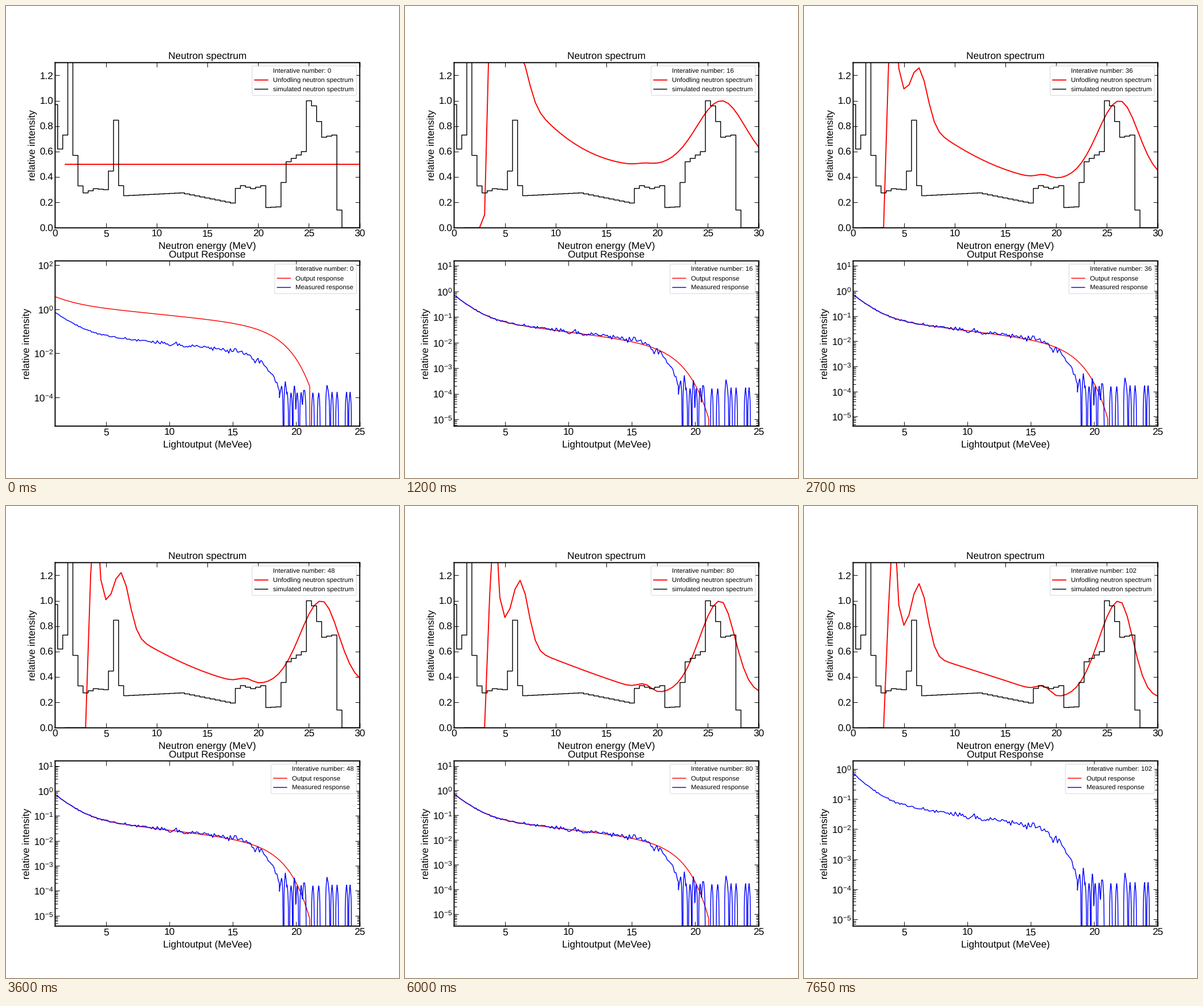
A matplotlib script that plays this animation: 683x820 px, repeating every 7.8 s.

```python
import numpy as np
import matplotlib.pyplot as plt
from matplotlib.animation import FuncAnimation
from matplotlib.ticker import LogLocator

FRAMES, STEP_MS = 52, 150
LAST = 2 * (FRAMES - 1)
DPI = 68.3
EDGE = 21.08       # highest light output of the folded response
ONE_COUNT = 1.7e-4
TINY = 1e-12

plt.rcParams.update({
    "font.family": "Liberation Sans", "font.size": 18, "text.hinting": "none",
    "mathtext.fontset": "custom", "mathtext.rm": "Liberation Sans",
    "mathtext.default": "regular", "path.snap": False,
    "axes.titlesize": 18, "axes.labelsize": 18, "axes.linewidth": 2,
    "legend.fontsize": 12,
    "xtick.direction": "in", "ytick.direction": "in",
    "xtick.top": True, "ytick.right": True,
    "xtick.major.size": 8, "ytick.major.size": 8, "ytick.minor.size": 5,
    "xtick.major.width": 1, "ytick.major.width": 1, "ytick.minor.width": 1,
})

bins = np.arange(0, 30.1, .5)
energy = bins[2:]
light = np.arange(1, 25, .02)

# Corners of the simulated spectrum: energy, intensity
CORNERS = [
    (0, .97), (.5, .62), (1, .73), (1.5, 1.6), (2, .57), (2.5, .33), (3, .275),
    (4, .308), (5, .3), (5.5, .447), (6, .847), (6.5, .332), (7, .253),
    (12.5, .275), (17.5, .195), (18, .31), (18.5, .332), (19.5, .308),
    (20.5, .332), (21, .16), (22, .165), (22.5, .357), (23, .52), (24.5, .6),
    (25, 1), (25.5, .96), (26.5, .713), (27.5, .73), (28, .14), (28.5, 0)]
simulated = np.interp(bins, *zip(*CORNERS))

# Isolated counts in the measured tail; a repeated place counts again
COUNTS = [18.73, 18.85, 18.85, 19.14, 19.14, 19.14, 19.28, 19.59, 19.855, 19.855,
          20.07, 20.385, 20.58, 20.67, 21.31, 21.77, 22.42, 22.42, 22.53,
          22.82, 23.22, 23.96, 24.24]


def gauss(x, center, width):
    return np.exp(-.5 * ((x - center) / width) ** 2)


def progress(n):
    """Logarithmic progress, zero at eight iterations."""
    return np.log(max(n, 1) / 8)


def spectrum(n):
    """Unfolded spectrum: base, tail to low energies and three peaks."""
    if n == 0:
        return np.full(energy.size, .5)
    t = progress(n)
    base = .585 - .137 * t
    tail = (.386 - .038 * t) * (np.clip(20 - energy, 0, None) / 11) ** (3 - .8 * t)
    center = 26.2 + .3 * np.exp(-1.2 * t)
    width = np.where(energy < center, 1.95 + np.exp(-1.1 * t), 2.85 * np.exp(-.3 * t))
    y = base + tail + (1 - base) * gauss(energy, center, width)
    y += (.2 + .135 * t) * gauss(energy, 6.5, .8)
    y += (.6 + .18 * t) * np.exp(-abs(energy - 4) / .4)
    y += .022 * max(t, 0) * gauss(energy, 18.75, .7)
    y *= np.exp(-1.4 * n * np.clip(3.35 - energy, 0, None) ** 2)
    if n == LAST:
        y[0] = np.nan
    return y


def falling(x, fast, slow, fast_len, slow_len, edge, steep):
    """log10 of two exponentials, cut off by an edge near 18 MeVee."""
    y = fast * np.exp(-(x - 1) / fast_len) + slow * np.exp(-(x - 1) / slow_len)
    return np.log10(y) - edge * np.exp(steep * (x - 18))


def response(n):
    t = progress(n)
    first = falling(light, 2, 1.75, 1.2, 7.6, .456, .57)
    fitted = falling(light, .63, .092, 1, 7 + .15 * t, .456, .57 + .018 * t)
    w = .1 ** (n / 2)
    return np.where(light <= EDGE, 10 ** (w * first + (1 - w) * fitted), TINY)


def measured():
    """Noisy falling curve that ends in isolated counts."""
    rng = np.random.default_rng(4)
    nodes = np.arange(1, 18.8, .115)
    noise = .0045 * nodes * rng.normal(size=nodes.size)
    trend = falling(nodes, .63, .092, 1, 7.35, .86, .9)
    body = 10 ** np.interp(light, nodes, trend + noise)
    body[light > 18.68] = 0
    tail = ONE_COUNT * sum(np.clip(1 - abs(light - c) / .113, 0, None) for c in COUNTS)
    return np.maximum(np.maximum(body, tail), TINY)


def log_limits(n, y):
    """Axis limits with a margin of 5 % of the data range."""
    low_end, high_end = -4.97, .9
    if n == 0:
        high_end = 1.86
    elif n == LAST:
        high_end = .02
    else:
        low_end = min(low_end, np.log10(y[light <= EDGE].min()))
    margin = .05 * (high_end - low_end)
    return 10 ** (low_end - margin), 10 ** (high_end + margin)


fig, (top, low) = plt.subplots(2, 1, figsize=(683.01 / DPI, 820.01 / DPI), dpi=DPI)

top.plot([], [], " ", label="Interative number: 0")
unfolded, = top.plot(energy, spectrum(0), "r", lw=2, label="Unfodling neutron spectrum")
top.step(bins, simulated, "k", where="mid", lw=1.5, label="simulated neutron spectrum")
top.set(xlim=(0, 30), ylim=(0, 1.3), title="Neutron spectrum")
top.set_xlabel("Neutron energy (MeV)", labelpad=5)

low.plot([], [], " ", label="Interative number: 0")
output, = low.plot(light, response(0), "r", lw=1.5, label="Output response")
low.plot(light, measured(), "b", lw=1.5, label="Measured response")
low.set_yscale("log")
low.yaxis.set_major_locator(LogLocator(numticks=7))
low.yaxis.set_minor_locator(LogLocator(subs=range(2, 10), numticks=7))
low.set(xlim=(1, 25), title="Output Response")
low.set_xlabel("Lightoutput (MeVee)", labelpad=5)

for ax in (top, low):
    ax.set_ylabel("relative intensity")
counters = [ax.legend(loc="upper right").get_texts()[0] for ax in (top, low)]


def draw(i):
    n = 2 * i
    for text in counters:
        text.set_text(f"Interative number: {n}")
    unfolded.set_ydata(spectrum(n))
    y = response(n)
    low.set_ylim(log_limits(n, y))
    # The iteration diverges at the end and leaves no response to show.
    output.set_ydata(np.full(light.size, np.nan) if n == LAST else y)
    return unfolded, output, *counters


anim = FuncAnimation(fig, draw, frames=FRAMES, interval=STEP_MS,
                     repeat=True, repeat_delay=0, blit=False)
plt.show()
```
